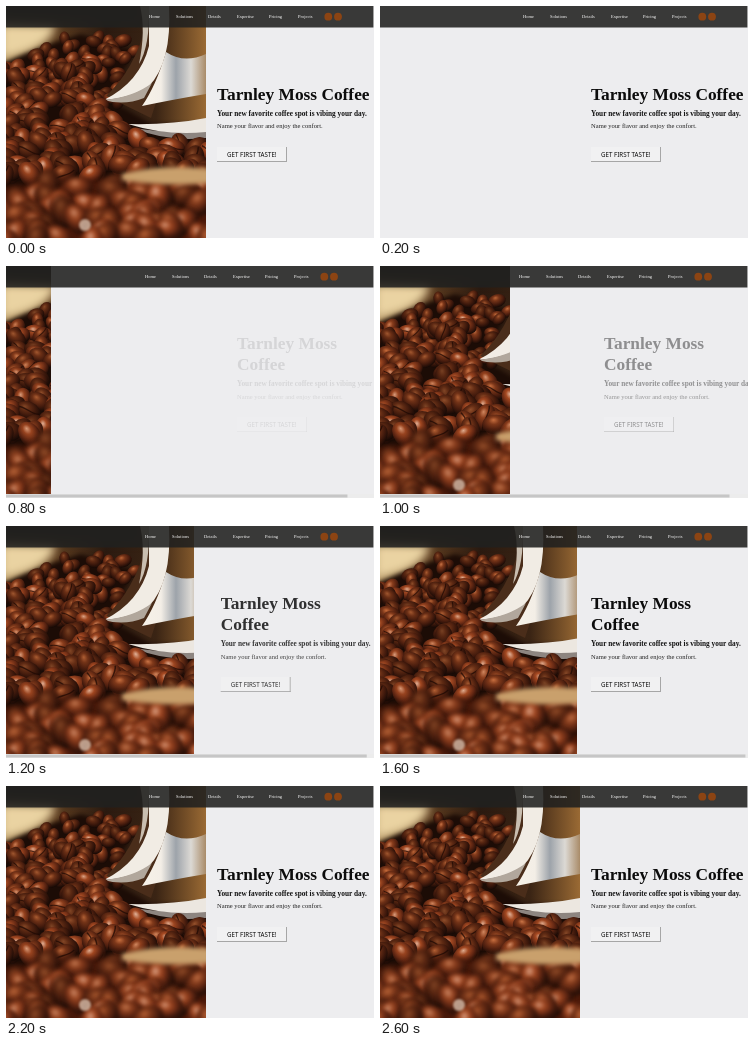
An HTML page with a canvas that plays this animation: 368x232 px, repeating every 2.8 s.

```html
<!DOCTYPE html>
<html lang="en">
<head>
<meta charset="utf-8">
<style>
  html, body { margin: 0; width: 100%; height: 100%; overflow: hidden; background: #ededef; }
  canvas { display: block; }
</style>
</head>
<body>
<canvas id="stage" width="368" height="232"></canvas>
<script>
const W = 368, H = 232, STEP = 200, LOOP = 2800;
const SERIF = '"Liberation Serif", serif', SANS = '"Noto Sans", sans-serif';
const ctx = document.getElementById('stage').getContext('2d');
const photo = paintPhoto();

function random(seed) {
  return () => (seed = seed * 16807 % 2147483647) / 2147483647;
}

function shape(c, color, path) {
  c.fillStyle = color;
  c.fill(new Path2D(path));
}

function gradient(c, x0, y0, x1, y1, ...colors) {
  const fill = c.createLinearGradient(x0, y0, x1, y1);
  colors.forEach((color, i) => fill.addColorStop(i / (colors.length - 1), color));
  return fill;
}

// The light always falls from the upper left, whatever the angle of the bean
function bean(c, x, y, size, angle, light, crease) {
  c.save();
  c.translate(x, y);
  c.rotate(angle);
  c.scale(size, size * 0.72);
  const lx = Math.cos(-2 - angle) * 0.5, ly = Math.sin(-2 - angle) * 0.5;
  const shade = c.createRadialGradient(lx, ly, 0, lx * 0.5, ly * 0.5, 1.25);
  shade.addColorStop(0, `hsl(21 55% ${30 + light * 46}%)`);
  shade.addColorStop(0.3, `hsl(18 66% ${21 + light * 19}%)`);
  shade.addColorStop(0.65, `hsl(15 68% ${13 + light * 11}%)`);
  shade.addColorStop(1, 'hsl(14 60% 5%)');
  c.fillStyle = shade;
  c.beginPath();
  c.arc(0, 0, 1, 0, 7);
  c.fill();
  if (crease) {
    c.strokeStyle = 'rgba(30,10,4,.75)';
    c.lineWidth = 0.14;
    c.stroke(new Path2D('M-.9 .1C-.3 -.25 .3 .4 .9 .05'));
  }
  c.restore();
}

function paintPhoto() {
  const canvas = document.createElement('canvas');
  canvas.width = 200;
  canvas.height = H;
  const c = canvas.getContext('2d');
  const rnd = random(71);

  // Warm, blurred background
  c.fillStyle = gradient(c, 0, 0, 200, 0, '#a98a5a', '#5d3d20', '#2b1a10', '#3a2414', '#9a6a34');
  c.fillRect(0, 0, 200, H);
  c.filter = 'blur(5px)';
  shape(c, '#ead3a2', 'M-5 18H50Q45 45 -5 52Z');
  shape(c, '#2c2418', 'M-9 -9H135V16H-9Z');
  c.filter = 'blur(2px)';
  shape(c, '#1c0c06', 'M-5 58Q40 38 75 28L130 45L100 92L145 118H205V240H-5Z');

  // Far beans in the shade of the cup
  c.filter = 'blur(.6px)';
  for (let i = 0; i < 70; i++) {
    const x = 22 + rnd() * 108, y = 30 + i * 0.95;
    if (y > 62 - x * 0.5) bean(c, x, y, 7 + rnd() * 2, rnd() * 6.3, rnd() ** 2 * 0.6, false);
  }

  // Tipped cup: mouth, body in stripes of light and shade, rim
  shape(c, '#4a2d1a', 'M140 20Q128 64 100 90L145 112L162 60Z');
  shape(c, gradient(c, 140, 65, 200, 65, '#f6f1e8', '#f3eee6', '#9da3aa', '#dcd9d4', '#a98b68'),
    'M160 46Q178 58 200 48V88Q170 93 136 100Q150 80 160 46Z');
  shape(c, '#c9beb0', 'M134 0H143Q144 40 133 58Q140 24 134 0Z');
  shape(c, '#f1ece4', 'M143 0H163Q166 56 143 80Q126 92 98 94Q134 76 143 40Z');
  shape(c, '#b1a79c', 'M98 94Q128 91 146 77L138 92Q118 100 98 94Z');

  // Saucer
  shape(c, '#8d8580', 'M128 122Q165 128 200 124V132Q160 136 128 122Z');
  shape(c, '#ece7e0', 'M122 118Q165 119 200 112V126Q160 130 122 118Z');

  // Pile of beans in focus
  c.filter = 'blur(.3px)';
  for (let i = 0; i < 270; i++) {
    const x = rnd() * 212 - 6, y = 45 + i * 0.45 + rnd() * 6;
    const edge = x < 88 ? 62 - x * 0.14 : x < 138 ? 100 + (x - 88) * 0.55 : 139;
    if (y > edge) bean(c, x, y, 7.5 + y / 32 + rnd() * 2, rnd() * 6.3, rnd() ** 1.5, rnd() < 0.3);
  }

  // Near beans, heavily blurred
  c.filter = 'blur(3px)';
  shape(c, '#4d1a0a', 'M-9 182L120 172H210V240H-9Z');
  c.filter = 'blur(2.2px)';
  for (let i = 0; i < 65; i++) {
    bean(c, rnd() * 212 - 6, 180 + i * 0.9, 14 + rnd() * 4, rnd() * 6.3, rnd(), false);
  }
  shape(c, '#c9a06c', 'M116 168Q155 157 204 163V177Q160 181 116 174Z');
  c.filter = 'blur(1.2px)';
  c.fillStyle = 'rgba(225,200,180,.75)';
  c.beginPath();
  c.arc(79, 219, 6, 0, 7);
  c.fill();
  return canvas;
}

function text(string, x, y, size, color = '#111', weight = 'normal', family = SERIF) {
  ctx.font = `${weight} ${size}px ${family}`;
  ctx.fillStyle = color;
  ctx.fillText(string, x, y);
}

function rect(x, y, w, h, color) {
  ctx.fillStyle = color;
  ctx.fillRect(x, y, w, h);
}

function nav(shift) {
  rect(0, 0, W - 0.6, 21.5, 'rgba(32,32,31,.88)');
  const items = { Home: 143, Solutions: 170, Details: 202, Expertise: 231, Pricing: 263, Projects: 292 };
  for (const [label, x] of Object.entries(items)) text(label, x - shift, 12.2, 4.5, '#fff');
  ctx.fillStyle = '#8c4413';
  for (const x of [322.3, 332]) {
    ctx.beginPath();
    ctx.arc(x - shift, 10.7, 3.9, 0, 7);
    ctx.fill();
  }
}

function copy(x, wrapped, alpha) {
  ctx.globalAlpha = alpha;
  const drop = wrapped ? 10.5 : 0;
  if (wrapped) {
    text('Tarnley Moss', x, 83, 17.35, '#0c0c0c', 'bold');
    text('Coffee', x, 104, 17.35, '#0c0c0c', 'bold');
  } else {
    text('Tarnley Moss Coffee', x, 93.5, 17.35, '#0c0c0c', 'bold');
  }
  text('Your new favorite coffee spot is vibing your day.', x, 109.5 + drop, 7.3, '#111', 'bold');
  text('Name your flavor and enjoy the confort.', x, 122.3 + drop, 6.55, '#222');
  const top = Math.round(140.5 + drop);
  rect(x, top, 70, 15, '#f1f1f2');
  rect(x, top + 14, 70, 1, '#a6a6a6');
  rect(x + 69, top, 1, 15, '#a6a6a6');
  text('GET FIRST TASTE!', x + 10, top + 9.5, 6.2, '#111', 'normal', SANS);
  ctx.globalAlpha = 1;
}

// Entrance poses from 400 ms on, one per step: photo width, text offset, text opacity
const entrance = [
  [0, 24, 0], [0, 24, 0], [45, 22, 0.1], [130, 15, 0.42], [187.5, 5.7, 0.84],
  [195.5, 3.3, 0.95], [197, 2, 1], [197, 0.8, 1], [197, 0, 1]
];

function draw(now) {
  const step = Math.floor(now % LOOP / STEP);
  const pose = entrance[step - 2];
  const width = pose ? pose[0] : step === 1 ? 0 : 200;
  rect(0, 0, W, H, '#ededef');
  if (width) ctx.drawImage(photo, 0, 0, width, H, 0, 0, width, H);
  nav(pose ? 4 : 0);
  if (pose) {
    const [, offset, alpha] = pose;
    copy(209 + offset, true, alpha);
    rect(0, 228, W, 4, '#ececec');
    rect(0, 228.5, W * W / (W + offset * 1.3), 3, '#c6c6c6');
  } else {
    copy(211, false, 1);
  }
  requestAnimationFrame(draw);
}
requestAnimationFrame(draw);
</script>
</body>
</html>
```
